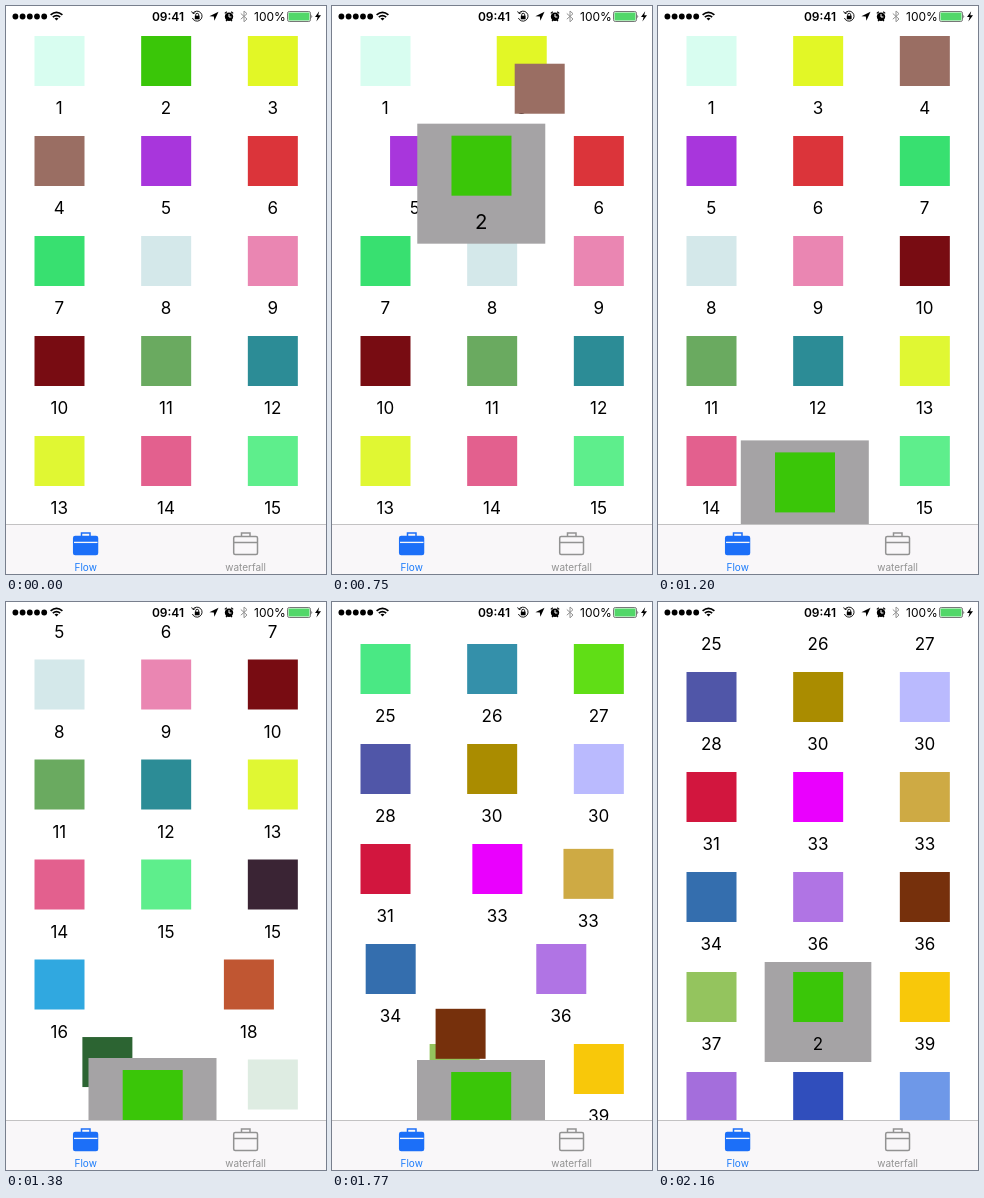
An HTML page for the animation above (2.19 s loop, 320 px wide and 568 px high).

```html
<!DOCTYPE html>
<html lang="en">
<head>
<meta charset="utf-8">
<title>Reorderable grid</title>
<style>
  html, body { margin: 0; width: 100%; height: 100%; overflow: hidden; background: #fff; }
  svg { display: block; width: 320px; height: 568px; }
  text { font-family: Inter, "Liberation Sans", sans-serif; text-anchor: middle; }
  .cell text { font-size: 17px; }
</style>
</head>
<body>
<svg viewBox="0 0 320 568">
  <rect width="320" height="568" fill="#fff"/>
  <g id="straight"></g>
  <g id="diagonal"></g>
  <g id="dragged"></g>

  <g id="status">
    <rect width="320" height="20" fill="#fff"/>
    <g id="signal"></g>
    <g fill="none" stroke="#000" stroke-width="1.7">
      <path d="M44.6 8.8Q50.5 3.8 56.4 8.8M46.8 11.2Q50.5 8 54.2 11.2"/>
      <path d="M50.5 14.6L48.5 12.6Q50.5 11 52.5 12.6Z" fill="#000" stroke="none"/>
    </g>
    <text x="162" y="14.7" font-size="12" font-weight="600">09:41</text>
    <g fill="none" stroke="#000" stroke-width=".9">
      <path d="M187 7.2A5 5 0 1 1 186.4 12M185.6 5.4L187 7.6 189.3 6.7"/>
      <path d="M189.7 10V8.8A1.5 1.5 0 0 1 192.7 8.8V10"/>
    </g>
    <rect x="188.8" y="9.7" width="4.8" height="3.6"/>
    <path d="M212.5 5.8L208.4 14.8 207.8 10.6 203.4 10.2Z"/>
    <circle cx="223" cy="10.8" r="4.2"/>
    <path d="M218.8 7.4L220.8 5.7M225.2 5.7L227.2 7.4M220 15.2L221 14M226 15.2L225 14" stroke="#000" stroke-width="1.2"/>
    <path d="M223 8V11H225.4" fill="none" stroke="#fff"/>
    <path d="M234.8 7.5L241 13 238 15.8V5L241 7.7 234.8 13.2" fill="none" stroke="#929292"/>
    <text x="264" y="14.6" font-size="12">100%</text>
    <rect x="281.5" y="5.5" width="23" height="10" rx="1.8" fill="#fff" stroke="#555" stroke-width=".8"/>
    <rect x="282.5" y="6.5" width="21" height="8" rx=".8" fill="#52d769"/>
    <path d="M305.5 8.8Q307 10.5 305.5 12.2Z" fill="#333"/>
    <path d="M313.2 5.2L309 11H311.6L310.4 15.4 315 9.3H312.2Z"/>
  </g>

  <g id="tabs">
    <rect y="518" width="320" height="50" fill="#f9f7f9"/>
    <rect y="518" width="320" height=".7" fill="#adadad"/>
    <g fill="none" stroke="#1c6ff8" stroke-width="1.5">
      <path d="M75.5 530V527H84V530"/>
      <rect x="67.7" y="530.5" width="23.8" height="18" rx="1.5" fill="#1c6ff8"/>
      <path d="M68 536.4H91.5" stroke="#f9f7f9" stroke-width="1.3"/>
    </g>
    <g fill="none" stroke="#929292" stroke-width="1.5">
      <path d="M235.5 530V527H244V530M228 536.4H251.5"/>
      <rect x="227.7" y="530.5" width="23.8" height="18" rx="1.5"/>
    </g>
    <g font-size="10">
      <text x="79.7" y="564.6" fill="#1c7cfa">Flow</text>
      <text x="239.6" y="564.6" fill="#929292">waterfall</text>
    </g>
  </g>
</svg>
<script>
const LOOP = 2190, TICK = 30, MOVE = 150;
const COLUMNS = 3, CELL_W = 320 / COLUMNS, CELL_H = 100, TOP = 20;
const PICKED = 1, LIFT_AT = 270, DROP_AT = 2010;

const colors = `d8fdf0 3ac608 e2f726 9a6e63 a836dc db343a 38e070 d4e8ea ea86b2 780c12
  6aaa60 2c8c96 e0f733 e3608e 5eee8c 3a2434 30a8e0 c05632 2c6432 f01424
  deece2 d60cbe e8f6c6 a80850 e43cf4 4ae884 3490aa 60de16 5056a8 aa8c00
  babafe d2163e ea00fe ceaa44 346eae b074e4 76300c 94c45e f8c80a a46edc
  304ebc 6e98e8`.split(/\s+/);

// Cells below the first screen are numbered one late, except in the last column
const label = i => i < 15 || (i % 3 === 2 && i !== 26) ? i + 1 : i;

// Key points: [time, x, y] of the dragged cell's centre, [time, offset] of the list
const dragPath = [[LIFT_AT, 160, 70], [420, 150, 66], [560, 150, 66], [822, 149, 220],
  [930, 148, 322], [1080, 147, 480], [1380, 146.5, 516], [1620, 146.5, 529],
  [1770, 149, 518], [1820, 150, 457], [DROP_AT, 153, 412], [2160, 160, 410]];
const scrollPath = [[1200, 0], [1332, 108], [1380, 172.5], [1620, 522.5], [1640, 592.5],
  [1770, 788], [1820, 860]];

const $ = id => document.getElementById(id);
const mix = (a, b, p) => a + (b - a) * p;
const clamp = p => Math.min(1, Math.max(0, p));

function ease(p) {
  p = clamp(p);
  return p * p * (3 - 2 * p);
}

function follow(path, t) {
  const next = path.findIndex(point => point[0] > t);
  const i = next < 0 ? path.length - 1 : Math.max(1, next);
  const [t0, ...from] = path[i - 1], [t1, ...to] = path[i];
  const p = clamp((t - t0) / (t1 - t0));
  return from.map((a, k) => mix(a, to[k], p));
}

// The gap drops one row each time the dragged centre enters a new row
const rowTimes = [];
for (let t = 0; t < DROP_AT; t++) {
  const y = follow(dragPath, t)[1] + follow(scrollPath, t)[0];
  if (y >= TOP + CELL_H * (rowTimes.length + 1)) rowTimes.push(t);
}

function add(parent, tag, attrs, text = "") {
  const el = document.createElementNS("http://www.w3.org/2000/svg", tag);
  for (const name in attrs) el.setAttribute(name, attrs[name]);
  el.textContent = text;
  return parent.appendChild(el);
}

for (let i = 0; i < 5; i++) add($("signal"), "circle", { cx: 9.4 + i * 7.2, cy: 10.5, r: 2.9 });

let backdrop;
const cells = colors.map((color, i) => {
  const layer = i === PICKED ? "dragged" : i % COLUMNS ? "straight" : "diagonal";
  const cell = add($(layer), "g", { class: "cell" });
  if (i === PICKED) backdrop = add(cell, "rect", { width: CELL_W, height: CELL_H, fill: "#a5a3a5" });
  add(cell, "rect", { x: 28.5, y: 10, width: 50, height: 50, fill: "#" + color });
  add(cell, "text", { x: CELL_W / 2, y: 88 }, label(i));
  return cell;
});

const slot = i => [i % COLUMNS * CELL_W, TOP + Math.floor(i / COLUMNS) * CELL_H];

function place(i, t, scroll) {
  let [x, y] = slot(i);
  if (i > PICKED) {
    const movesAt = rowTimes[Math.floor((i - PICKED - 1) / COLUMNS)] ?? Infinity;
    const p = ease((t - movesAt) / MOVE);
    const [nx, ny] = slot(i - 1);
    x = mix(x, nx, p);
    y = mix(y, ny, p);
  }
  cells[i].setAttribute("transform", `translate(${x} ${y - scroll})`);
}

function draw(t) {
  const [scroll] = follow(scrollPath, t);
  cells.forEach((_, i) => i !== PICKED && place(i, t, scroll));

  const [x, y] = follow(dragPath, t);
  const scale = 1 + 0.2 * (ease((t - LIFT_AT) / MOVE) - ease((t - DROP_AT) / MOVE));
  backdrop.setAttribute("visibility", t >= LIFT_AT ? "visible" : "hidden");
  cells[PICKED].setAttribute("transform",
    `translate(${x} ${y}) scale(${scale}) translate(${-CELL_W / 2} ${-CELL_H / 2})`);
}

const start = performance.now();
function frame() {
  const t = (performance.now() - start) % LOOP;
  draw(Math.floor(t / TICK) * TICK);
  requestAnimationFrame(frame);
}
frame();
</script>
</body>
</html>
```
